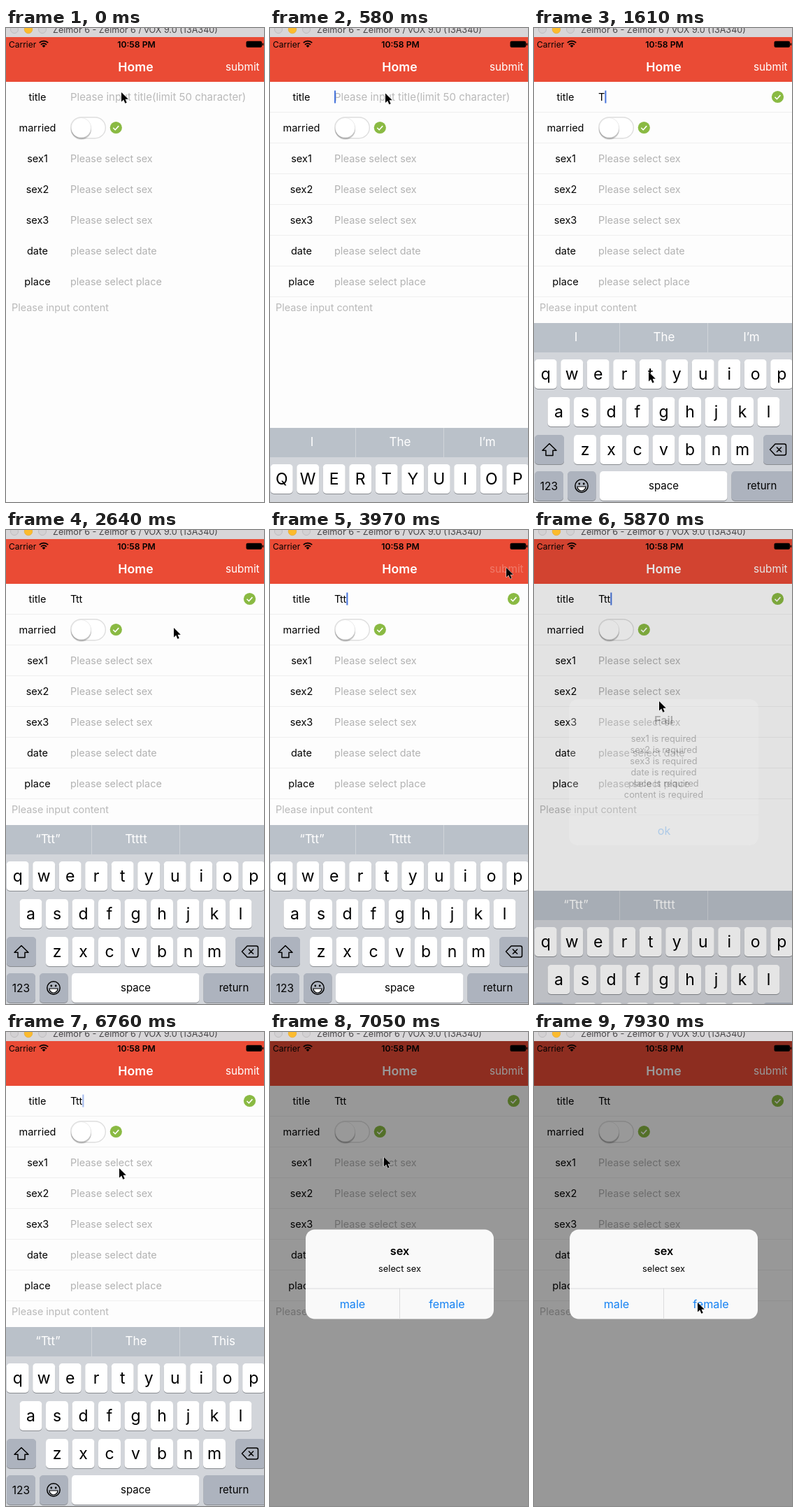
An HTML page for the animation above (8000 ms loop, 369 by 678 pixels).

```html
<!DOCTYPE html>
<html lang="en">
<head>
<meta charset="utf-8">
<title>Form validation</title>
<style>
  html, body { margin: 0; width: 100%; height: 100%; overflow: hidden; background: #fdfdfd; }
  svg { display: block; width: 100vw; height: 100vh; font-family: Inter, Roboto, sans-serif; }
</style>
</head>
<body>
<svg id="stage" viewBox="0 0 369 678" preserveAspectRatio="none"></svg>
<script>
const STEP = 146.85, LOOP = 8000;
const RED = '#ea4b35', BLUE = '#1582f3', GREY_KEY = '#adb3be';

const text = (x, y, str, size, attrs = '') =>
  `<text x="${x}" y="${y}" font-size="${size}" ${attrs}>${str}</text>`;
const mid = (x, y, str, size, attrs = '') => text(x, y, str, size, `text-anchor="middle" ${attrs}`);
const rect = (x, y, w, h, fill, attrs = '') =>
  `<rect x="${x}" y="${y}" width="${w}" height="${h}" fill="${fill}" ${attrs}/>`;
const circle = (x, y, r, fill, attrs = '') => `<circle cx="${x}" cy="${y}" r="${r}" fill="${fill}" ${attrs}/>`;
const line = (d, color, width, attrs = '') =>
  `<path d="${d}" fill="none" stroke="${color}" stroke-width="${width}" ${attrs}/>`;
const group = (id, content, attrs = '') => `<g id="${id}" ${attrs}>${content}</g>`;
const tick = (x, y) => circle(x, y, 8.6, '#8aba43') +
  line(`M${x - 4} ${y + .3}l2.9 2.9 5-5.6`, '#fff', 1.6);

const titleBar = () => rect(0, 0, 369, 13, '#d8d6d8') +
  circle(12, 2, 5.5, '#d3d1d3', 'stroke="#bebcbe"') +
  circle(32, 2, 5.8, '#fcbb2d', 'stroke="#e3a42a" stroke-width=".6"') +
  circle(52, 2, 5.5, '#d3d1d3', 'stroke="#bebcbe"') +
  text(67, 7, 'Zelmor 6 - Zelmor 6 / vOX 9.0 (13A340)', 12.6, 'fill="#484648"');

const navBar = () => rect(0, 12.5, 369, 64.5, RED) +
  text(4, 28, 'Carrier', 12) +
  line('M47.8 21.2a8.8 8.8 0 0 1 12.4 0M50 23.8a5.6 5.6 0 0 1 8 0', '#000', 1.8) +
  '<path d="M54 28l-2.4-2.6a3.4 3.4 0 0 1 4.8 0z"/>' +
  mid(186.5, 28, '10:58 PM', 12.2, 'font-weight="600"') +
  rect(343.5, 18.8, 22.5, 9, '#000', 'rx="2"') + rect(366.6, 21.5, 1.5, 3.6, '#000', 'rx=".7"') +
  mid(185.5, 62, 'Home', 17.7, 'font-weight="600" fill="#fff"') +
  text(314, 61, 'submit', 15.3, 'id="submit" fill="#fff"');

const rows = [
  ['title', ''], ['married', ''], ['sex1', 'Please select sex'], ['sex2', 'Please select sex'],
  ['sex3', 'Please select sex'], ['date', 'please select date'], ['place', 'please select place'],
];
const form = () => group('lines', rows.map((_, n) => rect(0, 120 + 44 * n, 369, 1, '#efefef')).join('')) +
  rows.map(([label, hint], n) =>
    mid(45, 104 + 44 * n, label, 14.5) + text(92, 104 + 44 * n, hint, 14.4, 'fill="#b2b2b2"')).join('') +
  text(92, 104, 'Please input title(limit 50 character)', 15, 'id="hint" fill="#b9b9b9"') +
  text(92, 104, '', 14.5, 'id="typed"') +
  rect(100, 89.5, 2, 18, '#4674dc', 'id="caret"') +
  group('titleTick', tick(348.5, 98.5)) +
  rect(92.7, 127.7, 49.6, 30, '#fff', 'rx="15" stroke="#dedede" stroke-width="1.4"') +
  circle(107.5, 145.5, 14.6, '#000', 'opacity=".1"') + circle(107.5, 144.2, 14.6, '#000', 'opacity=".18"') +
  circle(107.5, 142.6, 14.2, '#fff', 'stroke="#ddd" stroke-width=".6"') + tick(157.3, 142.5) +
  text(8, 404.5, 'Please input content', 14.4, 'fill="#b9b9b9"');

const key = (x, y, w, fill = '#fff', id = '') =>
  rect(x, y + 1, w, 42, '#898c91', 'rx="5"') + rect(x, y, w, 42, fill, `rx="5" ${id && `id="${id}"`}`);
const letters = (str, x, y) => [...str].map((c, n) =>
  key(x + 37.5 * n - 16, y, 32) + mid(x + 37.5 * n, y + 28.5, c, 23, 'class="cap"')).join('');

const keyboard = () => rect(0, 422, 369, 256, '#d2d5da') + rect(0, 422, 369, 42, '#bac1c9') +
  rect(122, 422, 1, 42, '#d0d4d9') + rect(248, 422, 1, 42, '#d0d4d9') +
  group('guesses', [60, 186, 311].map(x => mid(x, 447.5, '', 17, 'fill="#fff" class="guess"')).join('')) +
  letters('qwertyuiop', 16.7, 474) + letters('asdfghjkl', 35.5, 528) + letters('zxcvbnm', 73, 582) +
  key(1, 582, 42, GREY_KEY, 'shift') +
  '<path id="arrow" d="M22 594.5l10 9.7h-5v7.3h-10v-7.3h-5z" stroke="#000" stroke-width="1.5" stroke-linejoin="round"/>' +
  key(328, 582, 43, GREY_KEY) +
  line('M337.5 603l7.5-8h13q2.5 0 2.5 2.5v11q0 2.5-2.5 2.5h-13zM347 599.5l7 7m0-7l-7 7', '#000', 1.5, 'stroke-linejoin="round"') +
  key(1, 634, 41, GREY_KEY) + mid(21.3, 660.5, '123', 15.5) +
  key(48, 634, 40.5, GREY_KEY) + circle(68, 655, 9.2, 'none', 'stroke="#000" stroke-width="1.5"') +
  circle(64.8, 652, 1.4, '#000') + circle(71.2, 652, 1.4, '#000') +
  '<path d="M62 656h12a6 6 0 0 1-12 0z" fill="#fff" stroke="#000" stroke-width="1.2"/>' +
  key(94, 634, 182.5) + mid(185.5, 659.5, 'space', 15) +
  key(282.5, 634, 92, GREY_KEY) + mid(326, 659.5, 'return', 15) +
  group('popup',
    '<path d="M148 408.500H185.500Q195.500 408.500 195.500 418.500V450C195.500 464 183 464 183 478V511Q183 516 178 516H156Q151 516 151 511V478C151 464 138 464 138 450V418.500Q138 408.500 148 408.500Z" fill="#fff" stroke="#b4b8be" stroke-width=".8"/>' +
    mid(167, 451, 't', 36, 'class="cap"'));

const alertBox = (id, x, y, w, h, fill, title, message, buttons) => {
  const bar = y + h - 44;
  return group(id, rect(x, y, w, h, fill, 'rx="13"') +
    mid(185.5, y + 36, title, 16.3, 'font-weight="600"') +
    message.map((m, n) => mid(185.5, y + 60.5 + 16 * n, m, 12.8)).join('') +
    rect(x, bar, w, 1, '#dcdcde') +
    (buttons.length > 1 ? rect(185, bar, 1, 44, '#dcdcde') : '') +
    buttons.map((b, n) => mid(buttons.length > 1 ? 118 + 135 * n : 186, bar + 28.5, b, 16.2, `fill="${BLUE}"`)).join(''));
};

const stage = document.getElementById('stage');
stage.innerHTML = rect(0, 0, 369, 678, '#fdfdfd') + form() + group('keyboard', keyboard()) + navBar() +
  rect(0, 12.5, 369, 666, '#000', 'id="dim"') +
  alertBox('fail', 50, 242, 271, 209, '#f5f5f5', 'Fail',
    ['sex1', 'sex2', 'sex3', 'date', 'place', 'content'].map(s => s + ' is required'), ['ok']) +
  alertBox('choose', 51, 282.5, 269, 128, '#f9f9f9', 'sex', ['select sex'], ['male', 'female']) +
  titleBar() +
  '<path id="cursor" d="M0 0V13.500L3.200 10.600L5.400 15.700L7.700 14.700L5.500 9.800H9.800Z" stroke="#fff" stroke-width="1" paint-order="stroke"/>';

const $ = id => document.getElementById(id);
const caps = [...document.querySelectorAll('.cap')];
const guesses = [...document.querySelectorAll('.guess')];

// Tables of [step, value...]; tracks interpolate, states hold.
const cursorTrack = [[0, 165, 92], [4, 165, 94], [8, 164, 490], [9, 164, 492], [14, 164, 492], [16, 205, 172],
  [18, 240, 140], [22, 330, 62], [23, 338, 54], [30, 338, 54], [35, 190, 420], [36, 187, 424], [38, 187, 424],
  [40, 179, 245], [43, 165, 205], [45, 162, 195], [47, 162, 195], [48, 163, 179], [49, 166, 186], [52, 228, 370], [53, 234, 387]];
const keyboardTrack = [[0, 256], [2, 256], [3, 150], [4, 22], [5, 0], [27, 0], [28, 150], [29, 256],
  [38, 256], [39, 225], [40, 94], [41, 12], [42, 0], [46, 0], [47, 150], [48, 256]];
const failTrack = [[27, 0], [28, .6], [29, 1], [38, 1], [39, .8], [40, .25], [41, 0]];
const chooseTrack = [[46, 0], [47, .6], [48, 1]];
const typedStates = [[0, ''], [10, 'T'], [12, 'Tt'], [14, 'Ttt']];
const guessStates = [[0, 'I', 'The', 'I’m'], [11, '“T', 'The', 'Th'], [12, '“Tt”', 'The', 'This'],
  [14, '“Ttt”', 'Ttttt', ''], [43, '“Ttt”', 'The', 'This']];
const caretSpans = [[2, 9], [13, 27], [39, 46]];
const blink = [1, 1, 1, .5, 0, 0, .5];

const state = (table, i) => table.filter(r => r[0] <= i).pop().slice(1);
function track(table, i) {
  const next = table.findIndex(r => r[0] > i);
  if (next < 0) return table[table.length - 1].slice(1);
  if (next === 0) return table[0].slice(1);
  const a = table[next - 1], b = table[next], k = (i - a[0]) / (b[0] - a[0]);
  return a.slice(1).map((v, n) => v + (b[n + 1] - v) * k);
}
function caretOpacity(i) {
  if (i >= 9 && i < 13) return 1;
  const span = caretSpans.find(([from, to]) => i >= from && i <= to);
  return span ? blink[(i - (span[0] === 39 ? 40 : span[0]) + 7) % 7] : 0;
}
function showAlert(id, opacity, growing, cx, cy) {
  const s = growing ? 1 + .12 * (1 - opacity) : 1;
  $(id).setAttribute('opacity', opacity);
  $(id).setAttribute('transform', `translate(${cx} ${cy}) scale(${s}) translate(${-cx} ${-cy})`);
}

function draw(i) {
  const [typed] = state(typedStates, i), upper = i < 10;
  const [fail] = track(failTrack, i), [choose] = track(chooseTrack, i);

  $('lines').setAttribute('opacity', i ? 1 : 0);
  $('hint').setAttribute('opacity', typed ? 0 : 1);
  $('typed').textContent = typed;
  $('caret').setAttribute('x', typed ? 92 + $('typed').getComputedTextLength() : 92);
  $('caret').setAttribute('opacity', caretOpacity(i));
  $('titleTick').setAttribute('opacity', typed ? 1 : 0);
  $('submit').setAttribute('opacity', i === 27 ? .25 : 1);

  $('keyboard').setAttribute('transform', `translate(0 ${track(keyboardTrack, i)[0]})`);
  $('popup').setAttribute('opacity', [9, 11, 13].includes(i) ? 1 : 0);
  caps.forEach(c => c.textContent = upper ? c.textContent.toUpperCase() : c.textContent.toLowerCase());
  $('shift').setAttribute('fill', upper ? '#fff' : GREY_KEY);
  $('arrow').setAttribute('fill', upper ? '#000' : 'none');
  const words = state(guessStates, i);
  guesses.forEach((g, n) => g.textContent = words[n]);
  $('guesses').setAttribute('opacity', i === 11 ? .65 : 1);

  $('dim').setAttribute('opacity', .4 * Math.max(fail, choose));
  showAlert('fail', fail, i < 30, 185.5, 346.5);
  showAlert('choose', choose, true, 185.5, 346.5);
  $('cursor').setAttribute('transform', `translate(${track(cursorTrack, i).join(' ')})`);
}

const start = performance.now();
function frame() {
  const t = (performance.now() - start) % LOOP;
  draw(Math.min(54, Math.floor((t + 4) / STEP)));
  requestAnimationFrame(frame);
}
frame();
</script>
</body>
</html>
```
